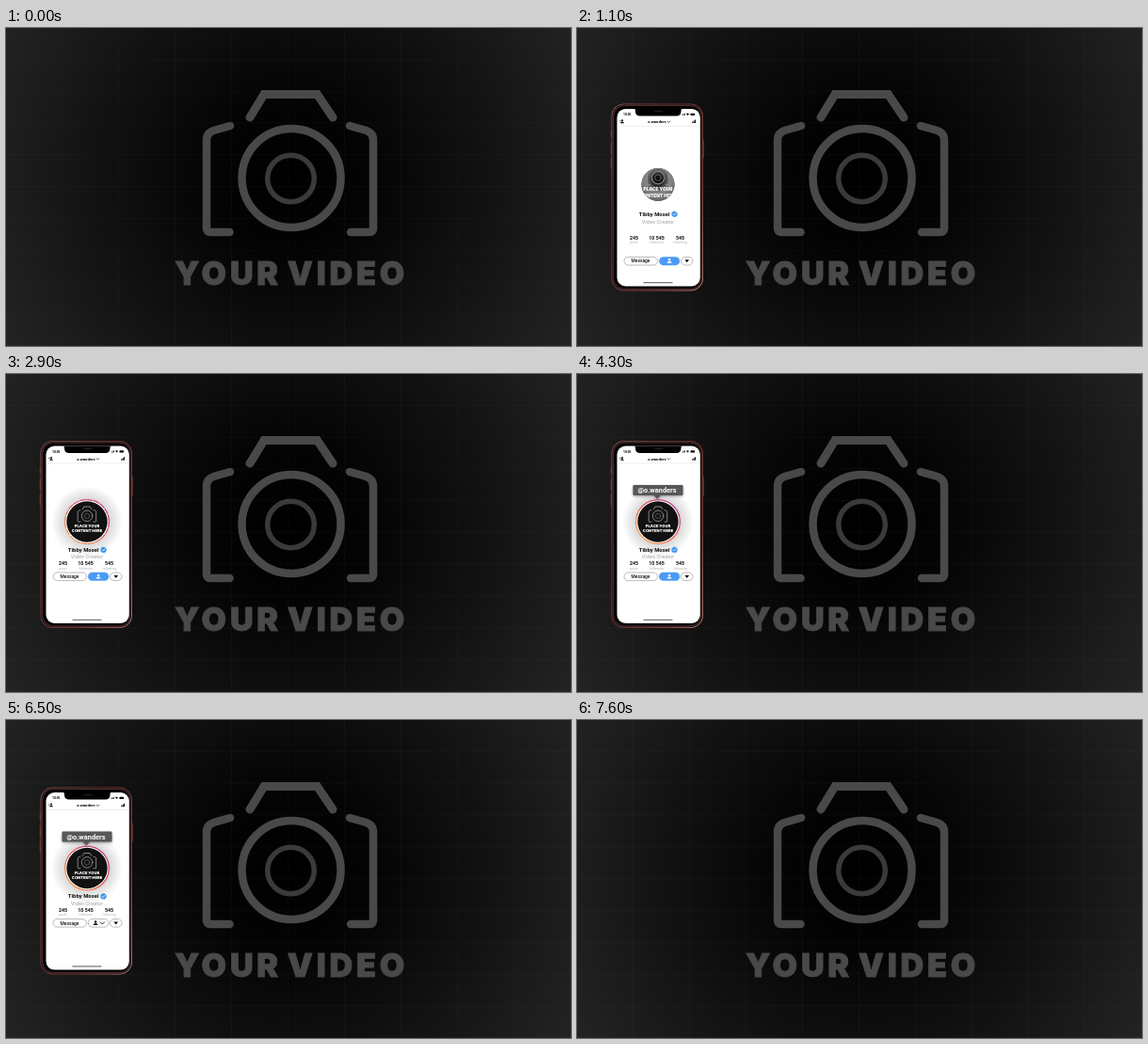
An HTML page that plays this animation: 600 px wide and 338 px high, repeating every 7900 ms.

```html
<!DOCTYPE html>
<html lang="en">
<head>
<meta charset="utf-8">
<title>Profile intro</title>
<style>
  html, body { margin: 0; width: 100%; height: 100%; overflow: hidden; background: #000; }
  svg { display: block; width: 100vw; height: 100vh; }
  text { font-family: Roboto, sans-serif; }
  .heavy { font-family: Inter, sans-serif; font-weight: 900; }
  .title { font-size: 34.2px; letter-spacing: 3.8px; word-spacing: -4.9px; fill: #494949; stroke: #494949; stroke-width: .8px; }
  .mid { text-anchor: middle; }
  .bold { font-weight: 700; }
  .pill { fill: #fff; stroke: #777; stroke-width: .5; }
  .line { fill: none; stroke-linecap: round; }
  .raised { filter: drop-shadow(0 1px 1.5px rgba(0, 0, 0, .4)); }
</style>
</head>
<body>
<svg viewBox="0 0 600 338">
  <defs>
    <radialGradient id="back" gradientUnits="userSpaceOnUse" cx="302" cy="160" r="345">
      <stop offset="0" stop-color="#000"/>
      <stop offset=".25" stop-color="#040404"/>
      <stop offset=".6" stop-color="#121212"/>
      <stop offset="1" stop-color="#232323"/>
    </radialGradient>
    <pattern id="grid" width="60" height="33.8" patternUnits="userSpaceOnUse">
      <path d="M60 0V33.8H0" fill="none" stroke="#fff" stroke-opacity=".045"/>
    </pattern>
    <linearGradient id="metal" x2="1" y2="1">
      <stop offset="0" stop-color="#8d5a59"/>
      <stop offset=".3" stop-color="#6f3536"/>
      <stop offset=".7" stop-color="#85403f"/>
      <stop offset="1" stop-color="#b98480"/>
    </linearGradient>
    <linearGradient id="story" x1="0" y1="1" x2="1" y2="0">
      <stop offset="0" stop-color="#f6b157"/>
      <stop offset=".5" stop-color="#e2574f"/>
      <stop offset="1" stop-color="#b62a93"/>
    </linearGradient>
    <radialGradient id="haze" gradientUnits="userSpaceOnUse" cx="86" cy="152" r="22">
      <stop offset="0" stop-color="#000"/>
      <stop offset=".25" stop-color="#222"/>
      <stop offset=".6" stop-color="#999"/>
      <stop offset="1" stop-color="#777"/>
    </radialGradient>
    <radialGradient id="glow">
      <stop offset=".6" stop-opacity=".16"/>
      <stop offset="1" stop-opacity="0"/>
    </radialGradient>
    <clipPath id="glass"><rect x="42.5" y="76.5" width="88.3" height="188.5" rx="9"/></clipPath>
    <clipPath id="round"><circle id="lens" cx="86" cy="157" r="21.7"/></clipPath>
    <g id="cam" class="line" stroke="currentColor">
      <path d="M259 95L274 70.5H330.5L347 95" stroke-width="9"/>
      <path d="M238 104L222 108.5Q213 111 213 119V213Q213 217 217 217H237.5M365 104L381 108.5Q390 111 390 119V213Q390 217 386 217H366" stroke-width="8.5"/>
      <circle cx="303" cy="159.5" r="52.5" stroke-width="8.5"/>
      <circle cx="302.5" cy="160" r="24.8" stroke-width="5.5" opacity=".8"/>
    </g>
    <g id="person">
      <circle cy="-1.3" r="1.25"/>
      <path d="M-2.4 2.3Q-2.4 .2 0 .2T2.4 2.3Z"/>
    </g>
  </defs>

  <rect width="600" height="338" fill="url(#back)"/>
  <rect width="600" height="338" fill="url(#grid)"/>
  <use href="#cam" color="#494949"/>
  <text class="heavy mid title" x="303" y="273.4">YOUR VIDEO</text>

  <g id="phone">
    <path d="M36.3 99V106M36.3 112V124M36.3 128V140M134.2 109V129" stroke="#7d4544" stroke-width=".9"/>
    <rect x="36.5" y="71" width="97.5" height="199" rx="13.5" fill="url(#metal)"/>
    <rect x="37.3" y="71.8" width="95.9" height="197.4" rx="12.8" fill="#1d1011"/>
    <rect x="38.7" y="73" width="93.4" height="195" rx="11.7" fill="#000" stroke="#94585a" stroke-width=".5"/>
    <g clip-path="url(#glass)">
      <rect x="42" y="76" width="90" height="190" fill="#fff"/>
      <circle id="halo" cx="86" cy="157" r="38" fill="url(#glow)"/>

      <path d="M60 76Q62 76 62 79Q62 84 67 84H105.5Q110.5 84 110.5 79Q110.5 76 112.5 76Z"/>
      <path class="line" d="M83 79.3H91" stroke="#333" stroke-width=".8"/>
      <text class="bold" x="49" y="83.8" font-size="3.3">10:05</text>
      <path d="M112 83.5V82.4M113.2 83.5V81.8M114.4 83.5V81.2" stroke="#111" stroke-width=".8"/>
      <path d="M116 81.8Q117.5 80.5 119 81.8L117.5 83.6Z"/>
      <rect x="120.5" y="81.3" width="4.5" height="2.2" rx=".6"/>

      <use href="#person" transform="translate(48 90) scale(.8)"/>
      <path d="M45 89.5H46.6" stroke="#000" stroke-width=".6"/>
      <text class="bold mid" x="85" y="91.8" font-size="4.2">o.wanders</text>
      <path class="line" d="M96 89.7L97.4 91.1L98.8 89.7" stroke="#111" stroke-width=".7"/>
      <path d="M122.8 91.7V90.2M124.2 91.7V89.2M125.6 91.7V88.2" stroke="#111" stroke-width="1.1"/>
      <path d="M42 95H132" stroke="#ddd" stroke-width=".5"/>

      <circle id="disc" cx="86" cy="157" r="24" fill="#fff"/>
      <circle id="ring" class="line" cx="86" cy="157" r="23.4" stroke="url(#story)" stroke-width="1.3" pathLength="100"/>
      <g clip-path="url(#round)">
        <rect x="62" y="133" width="48" height="48" fill="#111"/>
        <rect id="veil" x="62" y="133" width="48" height="48" fill="url(#haze)"/>
        <g id="shot">
          <use href="#cam" color="#8a8a8a" transform="translate(86 149) scale(.11) translate(-302 -143)"/>
          <g class="mid" fill="#fff" font-size="4.1">
            <text class="heavy" x="86" y="163">PLACE YOUR</text>
            <text class="heavy" x="86" y="168.2">CONTENT HERE</text>
          </g>
        </g>
      </g>

      <g id="name">
        <text class="bold" x="65.8" y="188.6" font-size="5.95" fill="#111">Tibby Mosel</text>
        <g transform="translate(103.5 186.9)">
          <circle r="2.9" fill="#3d95ee" stroke="#3d95ee" stroke-width="1" stroke-dasharray="1.14"/>
          <path class="line" d="M-1.3 0L-.3 1.1L1.5 -1" stroke="#fff" stroke-width=".8"/>
        </g>
      </g>
      <text id="role" class="mid" x="86" y="196.2" font-size="5.7" fill="#a2a2a2">Video Creator</text>
      <g id="stats" class="mid"></g>

      <g id="actions">
        <rect class="pill" x="50" y="211" width="35.5" height="8.6" rx="4.3"/>
        <text class="mid" x="67.5" y="217" font-size="4.9" font-weight="500" fill="#111">Message</text>
        <g id="follow">
          <rect id="tint" class="pill" x="87.3" y="211" width="21.7" height="8.6" rx="4.3"/>
          <use id="fan" href="#person"/>
          <path id="tick" class="line" d="M100.3 214.4L102.4 216.5L104.5 214.4" stroke="#111" stroke-width=".9"/>
        </g>
        <rect class="pill" x="110.5" y="211" width="12.5" height="8.6" rx="4.3"/>
        <path d="M114.5 213.9H119L116.75 216.9Z"/>
        <g id="burst" fill="#555"></g>
      </g>

      <g id="label" class="raised">
        <path d="M81 128.5H89.5L85.2 132.8Z" fill="#57575a"/>
        <rect x="59.5" y="118" width="53" height="11" rx="1.2" fill="#57575a"/>
        <text class="mid" x="85" y="126.2" font-size="7.4" font-weight="700" fill="#fff">@o.wanders</text>
      </g>
      <path class="line" d="M71 261.3H101" stroke="#777" stroke-width="1.3"/>
    </g>
  </g>
</svg>
<script>
const LOOP = 7900, STEP = 100, POWER = 4.57, DROP = 267;
const $ = id => document.getElementById(id);
const set = (id, attr, value) => $(id).setAttribute(attr, value);
const prog = (t, from, to) => Math.min(1, Math.max(0, (t - from) / (to - from)));
const out = u => 1 - (1 - u) ** 3;
const back = u => 1 + 2.4 * (u - 1) ** 3 + 1.4 * (u - 1) ** 2;
const shift = (id, y) => set(id, 'transform', `translate(0 ${y})`);
const zoom = (id, x, y, s) =>
  set(id, 'transform', `translate(${x} ${y}) scale(${s}) translate(${-x} ${-y})`);

$('stats').innerHTML = [[60.5, '245', 'posts'], [84.6, '10 545', 'followers'], [109.6, '545', 'following']]
  .map(([x, n, word]) => `<text class="bold" x="${x}" y="203" font-size="5.3" fill="#111">${n}</text>
    <text x="${x}" y="207.8" font-size="3.6" fill="#b2b2b2">${word}</text>`).join('');
$('burst').innerHTML = '<circle r=".35"/>'.repeat(8);

const slides = { name: 3, role: 5, stats: 24, actions: 45 };

function draw(t) {
  const rise = (1 - prog(t, 290, 1850)) ** POWER;
  const fall = prog(t, 6130, 7580) ** POWER;
  shift('phone', DROP * (rise + fall));
  $('phone').style.display = t < 300 || t >= 7600 ? 'none' : '';

  const rest = (1 - prog(t, 900, 1900)) ** 3;
  for (const id in slides) shift(id, slides[id] * rest);
  $('actions').style.filter = rest > 0 ? `blur(${rest}px)` : 'none';

  set('lens', 'r', 13.5 + 8.2 * out(prog(t, 900, 1900)));
  set('veil', 'opacity', 1 - prog(t, 1000, 1700));
  zoom('shot', 86, 157, 1 + .35 * rest);
  set('halo', 'opacity', prog(t, 1800, 2500));
  set('disc', 'opacity', prog(t, 1800, 2500));

  // dashes close up into a full ring
  const full = prog(t, 2100, 3100);
  const dash = 5 * full;
  set('ring', 'stroke-dasharray', full < 1 ? `${dash} ${5 - dash}` : 'none');
  set('ring', 'opacity', full > 0 ? 1 : 0);

  zoom('label', 85.2, 132.8, Math.max(0, back(prog(t, 3100, 3700))));

  const press = prog(t, 5000, 5400);
  zoom('follow', 98.1, 215.3, 1 - .12 * Math.sin(Math.PI * press));
  const done = t >= 5300;
  $('tint').style.fill = done ? '#fff' : '#4b9bf5';
  $('tint').style.stroke = done ? '#777' : '#4b9bf5';
  set('fan', 'transform', `translate(${98.1 - 3 * out(prog(t, 5600, 6000))} 215.2)`);
  set('fan', 'fill', done ? '#111' : '#fff');
  set('tick', 'opacity', prog(t, 5700, 6000));

  const spread = prog(t, 5300, 5900);
  set('burst', 'opacity', spread > 0 && spread < 1 ? 1 - spread : 0);
  [...$('burst').children].forEach((dot, i) => {
    const a = i * Math.PI / 4, r = 5 + 6 * out(spread);
    dot.setAttribute('cx', 98.1 + r * Math.cos(a));
    dot.setAttribute('cy', 215.3 + r * Math.sin(a));
  });
}

function tick(now) {
  draw(Math.floor((now % LOOP) / STEP) * STEP);
  requestAnimationFrame(tick);
}
draw(0);
requestAnimationFrame(() => tick(performance.now()));
</script>
</body>
</html>
```
